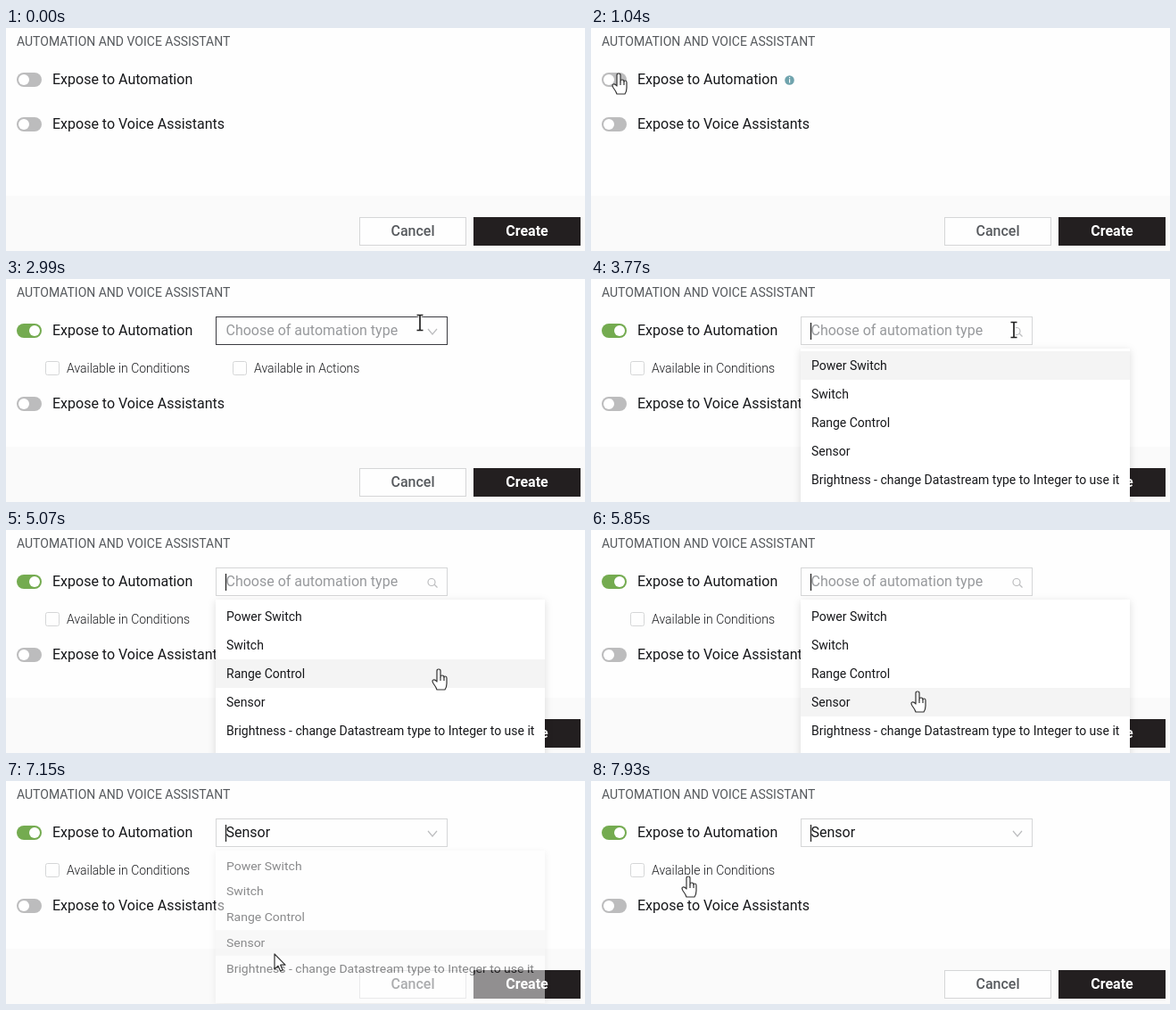
Animation, 649 px wide and 250 px high, one loop 8 s. Source, as an HTML page:

```html
<!DOCTYPE html>
<html lang="en">
<head>
<meta charset="utf-8">
<title>Expose to automation</title>
<style>
  html, body { margin: 0; width: 100%; height: 100%; overflow: hidden; background: #fefefe; }
  svg { display: block; font: 16px Roboto, sans-serif; fill: #17181b; }
  .small { font-size: 14px; }
  .light { font-weight: 300; }
  .frame { fill: #fefefe; stroke: #d5d6d7; }
  .line { fill: none; stroke: #bcbdbf; stroke-width: 1.2; }
  .white { fill: #fff; }
  #menu { filter: drop-shadow(0 2px 4px #0002); transform-origin: 0 78px; }
  #cursor path { fill: #fff; stroke: #333; stroke-width: 1.2; stroke-linejoin: round; }
  #cursor .beam { fill: none; stroke: #222; stroke-width: 1.7; }
  #cursor .halo { fill: none; stroke: #fff; stroke-width: 3.4; }
</style>
</head>
<body>
<svg width="649" height="250" viewBox="0 0 649 250">
  <text class="small" x="12" y="20" fill="#56595d">AUTOMATION AND VOICE ASSISTANT</text>

  <rect id="track" x="12" y="50" width="28" height="16" rx="8"/>
  <circle id="knob" class="white" cy="58" r="6"/>
  <text x="52" y="63">Expose to Automation</text>
  <g id="info">
    <circle cx="222.5" cy="58.5" r="5.3" fill="#6fa3ad"/>
    <path class="white" d="M222 55h1.2v1.3h-1.2zM222 57.3h1.2v4.2h-1.2z"/>
  </g>

  <g id="details">
    <rect id="select" class="frame" x="235.5" y="42.5" width="259" height="31"/>
    <text id="value" x="246.5" y="63"></text>
    <path id="caret" d="M246.5 49V68" stroke="#222" stroke-width="1.3"/>
    <path id="chevron" class="line" d="M473 56l5 6 5-6"/>
    <path id="search" class="line" d="M480.5 61.5l3 3M481 58.5a4 4 0 1 0-8 0 4 4 0 1 0 8 0"/>
    <rect class="frame" x="44.5" y="92.5" width="15" height="15" rx="2"/>
    <text class="small light" x="68" y="105">Available in Conditions</text>
    <g id="actions">
      <rect class="frame" x="254.5" y="92.5" width="15" height="15" rx="2"/>
      <text class="small light" x="278" y="105">Available in Actions</text>
    </g>
  </g>

  <g id="voice">
    <rect x="12" y="100" width="28" height="16" rx="8" fill="#bcbcbd"/>
    <circle class="white" cx="20" cy="108" r="6"/>
    <text x="52" y="113">Expose to Voice Assistants</text>
  </g>

  <rect y="188" width="649" height="62" fill="#fafafa"/>
  <rect class="frame" x="396.5" y="212.5" width="119" height="31"/>
  <rect x="524" y="212" width="120" height="32" fill="#231f20"/>
  <g text-anchor="middle">
    <text x="456" y="233" font-weight="500" fill="#56595d">Cancel</text>
    <text x="584" y="233" font-weight="700" fill="#fff">Create</text>
  </g>

  <g id="menu">
    <rect class="white" x="235" y="78" width="369" height="190"/>
    <rect id="active" x="235" width="369" height="32" fill="#f4f4f4"/>
  </g>

  <g id="cursor">
    <path id="arrow" d="M0 0V17L4 13.3L6.6 19L9.2 18L6.7 12.2H12Z"/>
    <g id="hand">
      <path d="M-2 14V2Q-2 0 0 0T2 2V9Q2 7 4 7T6 9.5Q6 8 7.5 8T9 10V16Q9 20 7 23H-2Q-3 20-6 16Q-8 12.5-6 12T-2 14Z"/>
      <path d="M2 9V13M6 9.5V13"/>
    </g>
    <g id="ibeam">
      <path class="halo" d="M-3.5-8.5H3.5M0-8V8M-3.5 8.5H3.5"/>
      <path class="beam" d="M-3.5-8.5H3.5M0-8V8M-3.5 8.5H3.5"/>
    </g>
  </g>
</svg>
<script>
const LOOP = 8000, STEP = 130;
const TOGGLE = 1430, OPEN = 3510, PICK = 7020;
const options = ["Power Switch", "Switch", "Range Control", "Sensor",
  "Brightness - change Datastream type to Integer to use it"];

// time, x, y of the pointer's hot spot
const path = [
  [390, 130, 260], [1040, 31, 51], [1820, 31, 51], [2990, 464, 49], [3510, 474, 57],
  [3900, 474, 57], [4940, 485, 156], [5070, 485, 156], [6370, 301, 194],
  [7540, 301, 194], [7930, 109, 107]
];

const $ = id => document.getElementById(id);
const show = (id, on) => $(id).style.display = on ? "" : "none";
const clamp = v => Math.max(0, Math.min(1, v));
const inside = ([x, y], l, t, r, b) => x >= l && x <= r && y >= t && y <= b;

options.forEach((label, i) => {
  const text = document.createElementNS("http://www.w3.org/2000/svg", "text");
  text.setAttribute("class", "small");
  text.setAttribute("x", 247);
  text.setAttribute("y", 102 + 32 * i);
  text.textContent = label;
  $("menu").append(text);
});

function pointer(t) {
  const i = path.findIndex(p => p[0] > t);
  if (i < 0) return path[path.length - 1].slice(1);
  if (i === 0) return path[0].slice(1);
  const [t0, x0, y0] = path[i - 1], [t1, x1, y1] = path[i];
  const u = (t - t0) / (t1 - t0), k = u * u * (3 - 2 * u);
  return [x0 + (x1 - x0) * k, y0 + (y1 - y0) * k];
}

function draw(time) {
  const t = Math.floor(time / STEP) * STEP;
  const pos = pointer(t);
  const on = clamp((t - TOGGLE + STEP) / 260);
  const expanded = on === 1;
  const menu = t < PICK ? clamp((t - OPEN) / 260) : clamp(1 - (t - PICK) / 260);
  const open = t >= OPEN && t < PICK + STEP;
  const picked = t >= PICK + STEP;
  const overSelect = expanded && inside(pos, 235, 42, 495, 74);
  const overMenu = menu === 1 && inside(pos, 235, 81, 604, 250);

  $("track").setAttribute("fill", on ? "#74ab50" : "#bcbcbd");
  $("knob").setAttribute("cx", 20 + 12 * on);
  show("info", t >= 520 && inside(pos, 0, 42, 230, 74));
  show("details", expanded);
  $("voice").setAttribute("transform", `translate(0 ${expanded ? 32 : 0})`);

  $("select").style.stroke = overSelect && !open ? "#3b3b40" : "";
  $("value").textContent = picked ? "Sensor" : "Choose of automation type";
  $("value").setAttribute("fill", picked ? "#17181b" : "#97999c");
  show("caret", t >= OPEN && (t - OPEN) % 1060 < 530);
  show("chevron", !open);
  show("search", open);
  show("actions", !picked);

  show("menu", menu > 0);
  $("menu").style.opacity = menu;
  $("menu").style.transform = `scaleY(${0.8 + 0.2 * menu})`;
  const row = t >= PICK ? 3 : overMenu ? Math.min(4, Math.floor((pos[1] - 81) / 32)) : 0;
  $("active").setAttribute("y", 81 + 32 * row);

  const hand = overMenu || inside(pos, 12, 50, 40, 66) ||
    expanded && menu === 0 && inside(pos, 44, 90, 206, 110);
  show("cursor", t >= 520);
  $("cursor").setAttribute("transform", `translate(${pos.map(Math.round)})`);
  show("hand", hand);
  show("ibeam", overSelect);
  show("arrow", !hand && !overSelect);
}

function tick() {
  draw(performance.now() % LOOP);
  requestAnimationFrame(tick);
}
tick();
</script>
</body>
</html>
```
